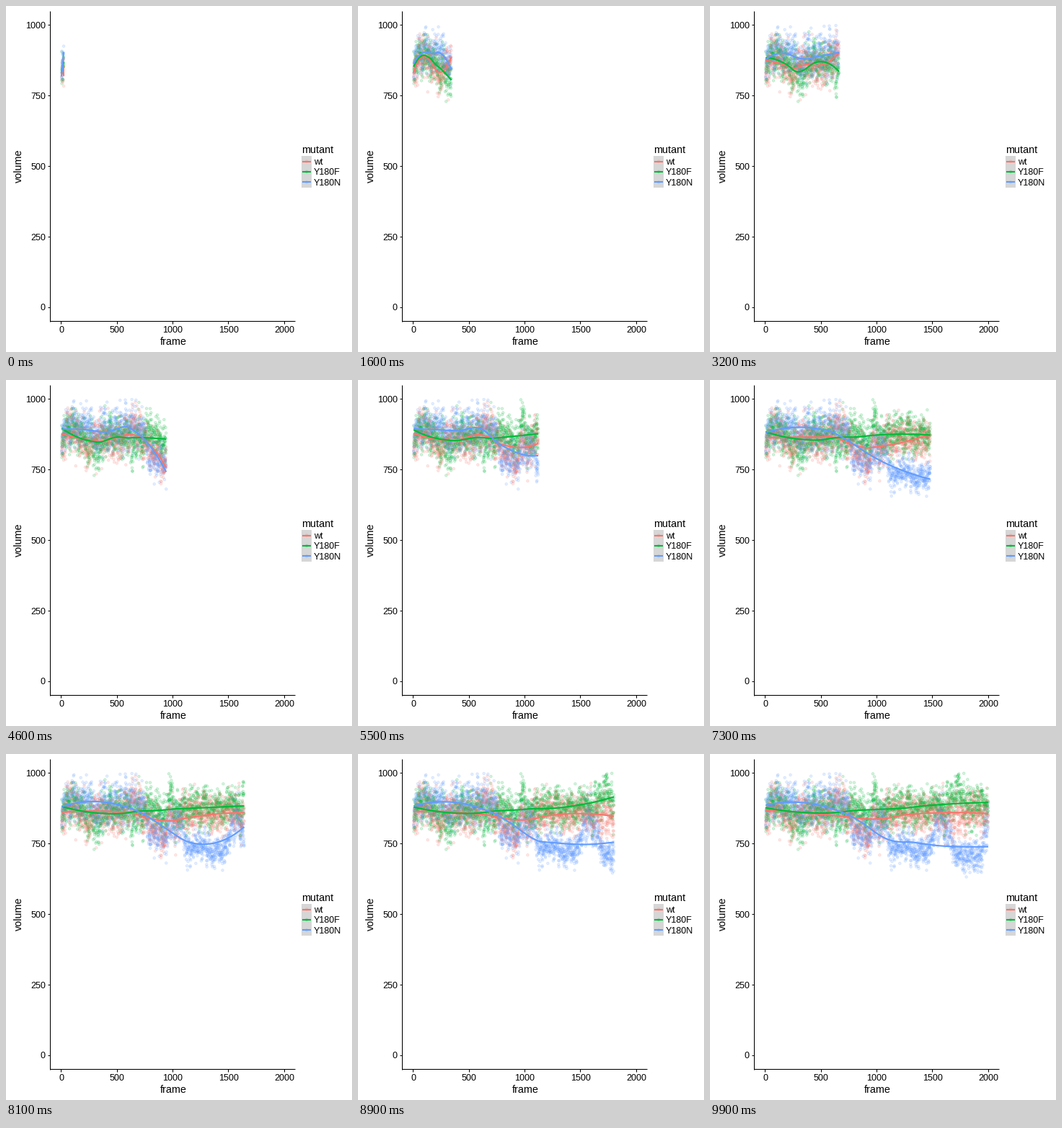
Animation, 480 px wide and 480 px high, one loop 10000 ms. Source, as a matplotlib script:

```python
import numpy as np
import matplotlib.pyplot as plt
from matplotlib.animation import FuncAnimation
from matplotlib.colors import to_rgba
from matplotlib.patches import Rectangle

PX = 0.75  # points per pixel at 96 dpi
STEP, FRAMES = 20, 100
N = STEP * FRAMES
NAMES = ["wt", "Y180F", "Y180N"]
COLORS = ["#F8766D", "#00BA38", "#619CFF"]

plt.rcParams["font.family"] = "Liberation Sans"
rng = np.random.default_rng(7)
t = np.arange(1, N + 1)


def bump(mid, width, height):
    return height * np.exp(-((t - mid) / width) ** 2)


def step(at, height, width=8):
    return height / (1 + np.exp(-np.clip((t - at) / width, -50, 50)))


def sample(level):
    """Noisy readings around a level, calmer when the volume is low."""
    level = level + bump(0, 12, -35)
    wander = np.convolve(rng.normal(size=N), np.ones(14), "same") / 14 ** 0.5
    noise = 33 * rng.normal(size=N) + 17 * wander
    y = level + noise * np.where(level < 770, 0.72, 1)
    return 1000 - np.abs(1000 - y)


def loess(n, grid, span=0.75):
    """Matrix of a local quadratic fit with tricube weights."""
    u = t[:n] - grid[:, None]
    h = np.sort(np.abs(u), axis=1)[:, int(span * n) - 1]
    u = u / h[:, None]
    w = np.clip(1 - np.abs(u) ** 3, 0, None) ** 3
    s = [(w * u ** k).sum(1) for k in range(5)]
    a = np.stack([np.stack(s[i:i + 3], -1) for i in range(3)], -2)
    e = np.zeros((len(grid), 3, 1))
    e[:, 0] = 1
    c = np.linalg.solve(a, e)[:, :, 0]
    return w * (c[:, :1] + c[:, 1:2] * u + c[:, 2:] * u * u)


def sx(x):
    return 76.95 + 0.15455 * x


def sy(y):
    return 418 - 0.3914 * y


wild = (868 + bump(90, 90, 25) + bump(240, 50, -35) + bump(660, 80, 20)
        + bump(860, 110, -40) + bump(915, 40, -85) + bump(1040, 25, -45)
        + step(1100, -10))
steady = (875 + bump(320, 35, -65) + bump(650, 25, -45) + bump(900, 40, -40)
          + bump(980, 30, 50) + bump(1040, 30, -40) + step(1150, 8)
          + bump(1710, 60, 45))
falling = (893 + bump(0, 40, -15) + bump(340, 40, -30) + bump(620, 100, 12)
           + step(755, -90) + bump(905, 40, -25) + bump(1050, 60, 40)
           + step(1105, -70) + bump(1400, 60, -18) + bump(1580, 75, 95)
           + step(1700, -28) + step(1960, 125))
series = np.array([sample(s) for s in (wild, steady, falling)])

# Dots of the three series interleaved in time order
dots = np.stack([np.repeat(sx(t), 3), sy(series.T.ravel())], axis=1)

fig = plt.figure(figsize=(5, 5), dpi=96, facecolor="white")
ax = fig.add_axes([0, 0, 1, 1])
ax.set(xlim=(0, 480), ylim=(480, 0))
ax.axis("off")


def label(x, y, s, size=12.5, ha="left", **kw):
    ax.text(x, y, s, fontsize=size * PX, ha=ha, va="baseline",
            color="black", **kw)


def rule(xs, ys, color="black", width=1.07):
    return ax.plot(xs, ys, color=color, lw=width * PX,
                   solid_capstyle="butt", zorder=2)[0]


def points(xy):
    cloud = ax.scatter([], [], s=(3.6 * PX) ** 2, linewidths=0.8 * PX,
                       zorder=1.5)
    cloud.set_facecolor([to_rgba(c, 0.16) for c in COLORS])
    cloud.set_edgecolor([to_rgba(c, 0.2) for c in COLORS])
    cloud.set_offsets(xy)
    return cloud


cloud = points(dots[:3])
curves = [rule([], [], c, 2.13) for c in COLORS]

# Axes
rule([61, 61], [7, 438])
rule([61, 401], [437, 437])
for v in range(0, 1001, 250):
    y = int(sy(v))
    rule([58, 61], [y, y])
    label(55, sy(v) + 4.5, str(v), ha="right")
for v in range(0, 2001, 500):
    x = int(sx(v))
    rule([x, x], [437, 441])
    label(sx(v), 453, str(v), ha="center")
label(231.8, 470, "frame", 14.4, "center")
label(21.5, 221.3, "volume", 14.4, "center", rotation=90,
      rotation_mode="anchor")

# Legend
label(410, 204, "mutant", 14.4)
ax.add_patch(Rectangle((410, 208), 14.3, 43.6, fc="#D6D6D6", lw=0))
rows = 215.5 + 14.4 * np.arange(3)
points([(417.1, y) for y in rows])
for name, color, y in zip(NAMES, COLORS, rows):
    rule([411.4, 422.8], [y, y], color, 2.13)
    label(427, y + 4.5, name)


def update(k):
    n = STEP * (k + 1)
    grid = np.linspace(1, n, 80)
    cloud.set_offsets(dots[:3 * n])
    for curve, y in zip(curves, series[:, :n] @ loess(n, grid).T):
        curve.set_data(sx(grid), sy(y))
    return [cloud, *curves]


anim = FuncAnimation(fig, update, frames=FRAMES, interval=100,
                     repeat=True, repeat_delay=0)
plt.show()
```
